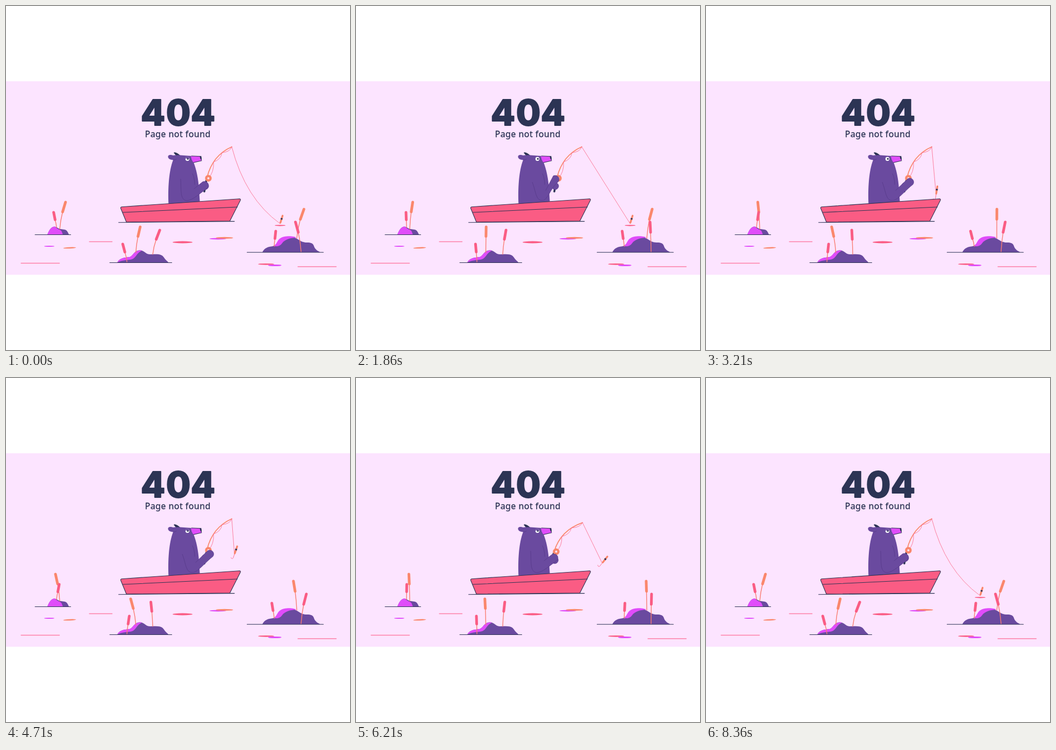
These frames come from a looping animation (640x640 px, 8430 ms). An HTML page:

```html
<!DOCTYPE html>
<html lang="en">
<head>
<meta charset="utf-8">
<title>Page not found</title>
<style>
  html, body { margin: 0; height: 100%; overflow: hidden; background: #fff; }
  svg { display: block; width: 100vw; height: 100vh; }
  path { stroke-linecap: round; stroke-linejoin: round; }
  .ink { fill: #2c3454; }
  .fur { fill: #6a4a9f; }
  .mag { fill: #e04cfa; }
  .pink { fill: #fa5c84; }
  .org { fill: #fa876c; }
  .edge { stroke: #2c3454; stroke-width: 1.1; }
  .fold { stroke: #573a8a; stroke-width: .8; }
  .wave { stroke: #fd7fa6; stroke-width: 1.3; }
  .rod { stroke: #fa876c; stroke-width: 1.7; }
  .thread { stroke: #fb7392; stroke-width: .9; }
  .line { fill: none; }
  text { stroke: #2c3454; stroke-linejoin: round; }
  .title { font: 800 66px Inter, sans-serif; text-anchor: middle; stroke-width: 2; }
  .sub { font: 500 16px "Noto Sans", sans-serif; letter-spacing: .45px; stroke-width: .3; }
</style>
</head>
<body>
<svg viewBox="0 0 640 640">
  <rect y="140" width="640" height="360" fill="#fce4ff"/>
  <text class="title ink" x="273.5 320.5 366.5" y="222">404</text>
  <text class="sub ink" x="258.5" y="244">Page not found</text>

  <!-- water -->
  <path class="wave" d="M28 478.5H99.5M155 438.5H197.5M543 485H614.5"/>
  <ellipse class="mag" cx="80.5" cy="447" rx="9.5" ry="1.1"/>
  <ellipse class="org" cx="118.5" cy="450" rx="12" ry="1.2" transform="rotate(-3 118 450)"/>
  <ellipse class="pink" cx="328.5" cy="439.5" rx="18.5" ry="1.9"/>
  <ellipse class="mag" cx="394" cy="433" rx="15.5" ry="1.5"/>
  <ellipse class="org" cx="406.5" cy="431.4" rx="16" ry="1.6"/>
  <ellipse class="pink" cx="484" cy="480.3" rx="15" ry="1.4"/>
  <ellipse class="mag" cx="500" cy="482.5" rx="12.5" ry="1.6"/>

  <!-- islands -->
  <path class="fur" d="M77 425C82 412 88 409 93 411C100 416 104 415 109 416C114 417 115 421 117 425Z"/>
  <path class="mag" d="M77 425C82 412 88 409 92 411C94 414 98 415 101 417C105 419 104 423 106 425Z"/>
  <path class="fur" d="M207 477C212 468 222 468 230 467C238 464 238 454 250 454.5C260 456 259 463 270 462C285 461 290 462 294 468C297 473 301 475 302 477Z"/>
  <path class="mag" d="M207 477C212 468 222 468 230 467C238 464 238 453 253 455C241 460 243 471 230 472C220 473 213 474 207 477Z"/>
  <path class="fur" d="M477 458C481 450 487 448 496 447C507 444 506 430 527 429C545 430 545 440 560 440C575 440 571 447 576 452C579 456 582 456 584 458Z"/>
  <path class="mag" d="M498 447C506 443 503 430 522 428.5C532 428 537 429 540 431C529 431 518 435 514 441C510 447 506 447 498 447Z"/>
  <path class="edge line" d="M54 425.5H120.5M193 477.5H308.5M448.5 458.3H590.5"/>
  <g id="reeds"></g>

  <!-- tackle -->
  <path id="handle" stroke="#2c3454" stroke-width="3.6"/>
  <path id="rod" class="rod line"/>
  <path id="loops" class="thread line"/>
  <circle id="reel" r="4.1" fill="#fce4ff" stroke="#fa876c" stroke-width="4.2"/>
  <ellipse id="ripple" class="pink" cx="510" cy="408.3" rx="10" ry="1.1"/>
  <path id="cast" class="thread line"/>
  <g id="bobber">
    <path id="hook" class="thread line" d="M0 0V7q-1 4 -4 1"/>
    <path stroke="#fa876c" stroke-width="3.4" d="M0 -2V-15.5"/>
    <path stroke="#2c3454" stroke-width="3.4" style="stroke-linecap:butt" d="M0 -8V-10.8"/>
  </g>

  <!-- bear -->
  <path class="ink" d="M312 273C313 271 319 273 324 278L316 278Z"/>
  <path class="fur" d="M302.5 370C301 340 303 306 311 286.5C306 286 302 284.5 301.5 281C301 277 306 276 311 278C318 277 330 278 345 279L349 291C354 303 358 322 359 340L361 370Z"/>
  <path class="fold line" d="M311 286Q315 287 317 285M347 312Q351 320 351 332"/>
  <path class="mag" d="M344 279L362 279.7Q364 280 364 287.5L349 291.5Q345 287 344 279Z"/>
  <path class="ink" d="M360.5 280L363 279.8Q364.2 281 364 287.8Q361 285 360.5 280Z"/>
  <path class="edge line" d="M345 279L363 279.8M349 291.3L364 287.8"/>
  <circle cx="337.5" cy="284.5" r="3.7" fill="#fff"/>
  <circle class="ink" cx="338.4" cy="284.4" r="1.6"/>
  <path id="lid" class="fur" d="M333.8 283.8A3.8 3.8 0 0 1 341.2 283.8Z"/>
  <circle id="paw" class="fur fold" r="6.5"/>
  <path id="arm" class="fur fold"/>

  <!-- boat -->
  <path class="pink edge" d="M215 373.7L434.500 358.8Q437 359 436 361.500L416.500 400L224 402L213.500 376.500Q213 374 215 373.7Z"/>
  <path class="edge line" d="M217.5 384L430.5 374M209.5 402.7L425 400.6"/>
</svg>
<script>
const LOOP = 8430, TURN = 2 * Math.PI;
const $ = id => document.getElementById(id);
const set = (el, attrs) => { for (const k in attrs) el.setAttribute(k, attrs[k]); };
const mix = (a, b, u) => a + (b - a) * u;
const mixPt = (a, b, u) => a.map((v, i) => mix(v, b[i], u));
const quad = (a, c, b, u) => mixPt(mixPt(a, c, u), mixPt(c, b, u), u);
const ease = (t, from, to) => {
  const u = Math.min(1, Math.max(0, (t - from) / (to - from)));
  return u * u * (3 - 2 * u);
};

// Taller reeds swing further and carry longer heads; lag is part of a turn.
function reed(color, x, y, height, lean, lag) {
  const add = (stroke, width) => {
    const p = document.createElementNS("http://www.w3.org/2000/svg", "path");
    set(p, { class: "line", stroke, "stroke-width": width });
    return $("reeds").appendChild(p);
  };
  const stem = add("#f97d72", 1.4), head = add(color, 5);
  const top = y - height, low = top + 8 + height * .2;
  return t => {
    const d = lean + height * .19 * Math.cos(TURN * (t / LOOP - lag));
    const neck = `${x + d * .5} ${low}`;
    set(stem, { d: `M${x} ${y}Q${x + d * .12} ${(y + low) / 2} ${neck}` });
    set(head, { d: `M${neck}L${x + d} ${top}` });
  };
}

const ORANGE = "#fa876c", PINK = "#fa5c84";
const reeds = [
  reed(ORANGE, 100, 415, 50, 1.5, .04),
  reed(PINK, 94, 412, 28, 0, .5),
  reed(PINK, 225, 476, 33, -1.5, .5),
  reed(ORANGE, 241.5, 459, 48, -1, 0),
  reed(PINK, 273, 462, 45, 4.5, 0),
  reed(PINK, 499, 447, 28, -1.5, -.1),
  reed(ORANGE, 541, 432, 54, 4, .07),
  reed(PINK, 549, 457, 55, 0, .5)
];

// bobber stops: x, y, tilt
const water = [510, 405, 17], boatside = [428, 351, 9], lifted = [425, 328, 19], behind = [400, 340, 62];

function fish(t) {
  const tighten = ease(t, 600, 1860), haul = ease(t, 1900, 3210), raise = ease(t, 3210, 4200);
  const swing = ease(t, 4750, 5640), fling = ease(t, 5900, 6500), loosen = ease(t, 6250, 6900);
  const pull = swing - fling - .2 * Math.sin(Math.PI * loosen);
  const work = ease(t, 600, 1100) - swing;

  // rod
  const base = mixPt([374, 319], [363, 326], pull);
  const bend = mixPt([384, 278], [377, 289], pull);
  const tip = mixPt([420, 262], [423, 277], pull);
  const reel = mixPt([376.5, 320.5], [368, 326], pull);
  const grip = mixPt([369, 345], [352, 345], pull);
  set($("handle"), { d: `M${base[0] - 1} ${base[1] + 4}L${grip}` });
  set($("rod"), { d: `M${base}Q${bend} ${tip}` });
  set($("reel"), { cx: reel[0], cy: reel[1] });
  let from = reel, loops = `M${reel}`;
  for (const u of [.4, .72, 1]) {
    const ring = quad(base, bend, tip, u);
    loops += `Q${(from[0] + ring[0]) / 2 + 6} ${(from[1] + ring[1]) / 2 + 4} ${ring}`;
    from = ring;
  }
  set($("loops"), { d: loops });

  // line and bobber
  let bob = mixPt(water, boatside, haul);
  bob = mixPt(bob, lifted, raise);
  bob = mixPt(bob, behind, swing);
  bob = mixPt(bob, water, fling);
  const [x, drop, tilt] = bob;
  const y = drop - 30 * Math.sin(Math.PI * fling);
  const slack = 25 * (1 - tighten + loosen);
  set($("cast"), { d: `M${tip}Q${(tip[0] + x) / 2 - slack * .8} ${(tip[1] + y) / 2 + slack} ${x} ${y}` });
  set($("bobber"), { transform: `translate(${x} ${y}) rotate(${tilt})` });
  const afloat = y > 402;
  set($("ripple"), { opacity: +afloat });
  set($("hook"), { opacity: +!afloat });

  // one paw holds the rod, the other cranks the reel
  const hold = mixPt([370.5, 335], [369, 343], pull);
  set($("paw"), { cx: hold[0], cy: hold[1] });
  const spin = TURN * (Math.min(t, 4368) - 3210) / 579;
  const crank = [374 + 5.8 * Math.cos(spin), 327 + 5.8 * Math.sin(spin)];
  const [px, py] = mixPt(mixPt([370, 333], [368, 335], pull), crank, work);
  const sx = 325 + 3 * work, sy = 322 + 6 * work, ex = 337 + 10 * work;
  set($("arm"), { d: `M${sx} ${sy}C${sx + 1 + work * 6} 345 ${ex - 13} 362 ${ex} 362` +
    `C${ex + 9} 362 ${px - 8} ${py + 15} ${px + 4} ${py + 6}` +
    `C${px + 10} ${py + 1} ${px + 5} ${py - 9} ${px - 4} ${py - 6}L${350 + work * 3} ${340 + work * 3}` });

  set($("lid"), { opacity: 1 - ease(t, 600, 1000) + ease(t, 3500, 4100) });
}

function frame() {
  const t = performance.now() % LOOP;
  for (const sway of reeds) sway(t);
  fish(t);
  requestAnimationFrame(frame);
}
frame();
</script>
</body>
</html>
```
